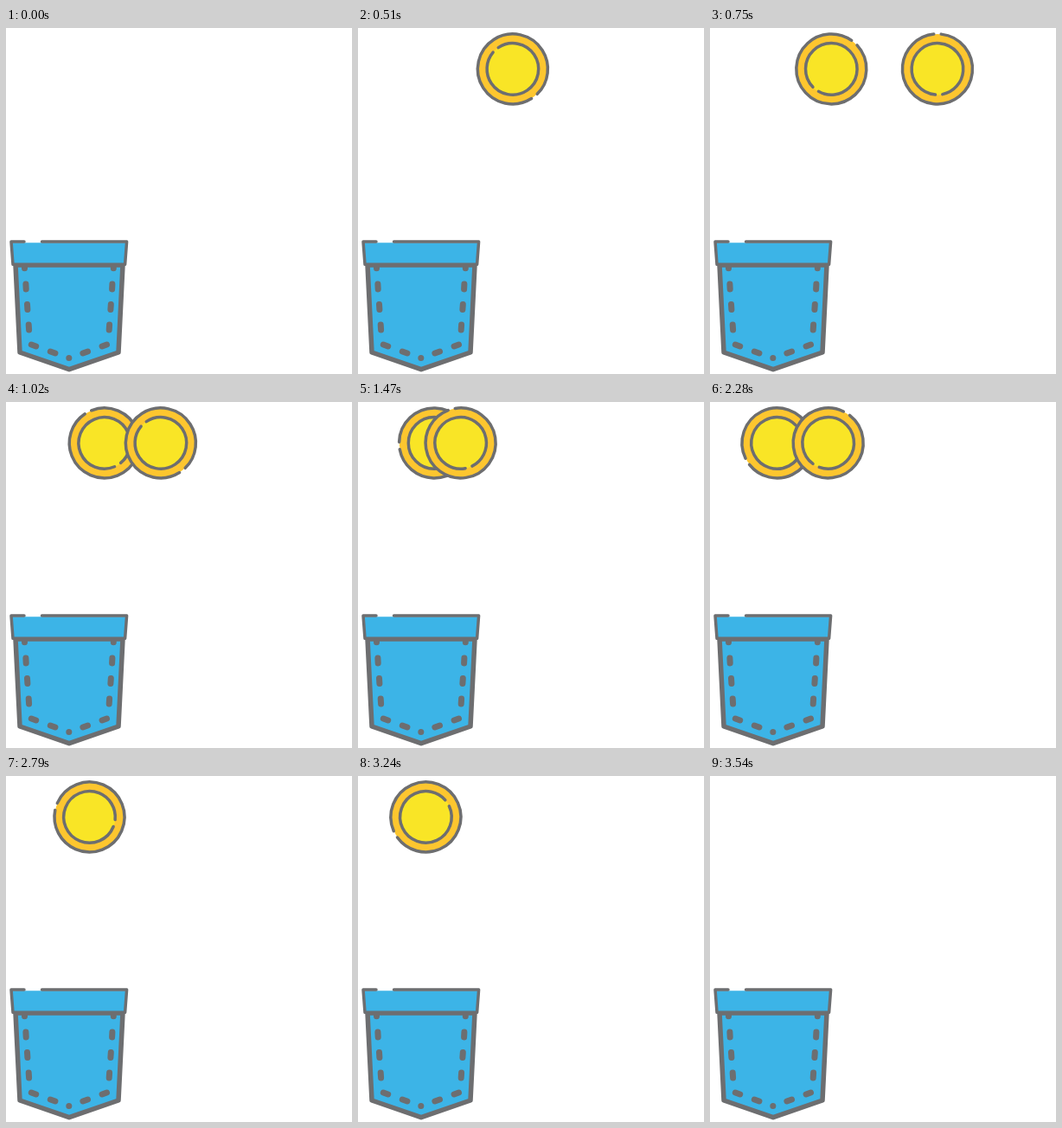
Write an HTML page that moves like this. It is 400 px wide and 400 px high and loops after 3.6 s.

```html
<!DOCTYPE html>
<html lang="en">
<head>
<meta charset="utf-8">
<title>Coins into a pocket</title>
<style>
  html, body { margin: 0; width: 100%; height: 100%; overflow: hidden; background: #fff; }
  svg { display: block; width: 100vw; height: 100vh; }
  .line { fill: none; stroke: #6d6e70; stroke-width: 3.5; stroke-linecap: round; stroke-linejoin: round; }
  .blue { fill: #3cb4e7; }
</style>
</head>
<body>
<svg viewBox="0 0 400 400">
  <defs>
    <g id="coin">
      <circle r="40.3" fill="#fdc62f"/>
      <circle r="30" fill="#f9e526"/>
      <circle class="line" r="40.5" pathLength="360" stroke-dasharray="348 12" transform="rotate(6)"/>
      <circle class="line" r="29.8" pathLength="360" stroke-dasharray="344 16" transform="rotate(184.5)"/>
    </g>
    <g id="stitches" class="line" stroke-linecap="round">
      <path style="stroke-width:7" d="M21.5 277.5v.3M22.9 296l.3 6M24.5 319.5l.4 6M26.2 343l.4 6M29.3 366l5.4 2M51.3 374l5.6 2"/>
    </g>
  </defs>
  <g id="coins"></g>
  <g id="pocket">
    <path class="line blue" style="fill:#3cb4e7;stroke-width:5.5" d="M11 274L16 375L73 394.7L130 375L135 274Z"/>
    <use href="#stitches"/>
    <use href="#stitches" transform="matrix(-1 0 0 1 145.8 0)"/>
    <circle cx="72.8" cy="381.5" r="3.5" fill="#6d6e70"/>
    <path class="blue" d="M6 248.3H140L138 273.5H8Z"/>
    <path class="line" d="M21 247H6L8 273.3H137.6L139.6 247H41.5"/>
  </g>
</svg>
<script>
const LOOP = 3600, STARTS = [0, 510, 1500];
const ROLL = 1770, REST_X = 77.5, ROLL_Y = 47.4;
const GRAVITY = 0.0055, HIT = 180, BOUNCE = 90, FALL = HIT + BOUNCE;

const pocket = document.getElementById('pocket');
const coins = STARTS.map(() => {
  const coin = document.createElementNS('http://www.w3.org/2000/svg', 'use');
  coin.setAttribute('href', '#coin');
  return document.getElementById('coins').appendChild(coin);
});

// Fast entry from the right that slows to a steady creep
function rollX(age) {
  const r = 1 - Math.cbrt((Math.min(age, ROLL) + 60) / (ROLL + 60));
  return REST_X + r * (165 + r * (280 + r * 580));
}

function draw(now) {
  const t = now % LOOP;
  let dip = 0;
  coins.forEach((coin, i) => {
    const age = t - STARTS[i];
    const fall = Math.max(0, age - ROLL);
    const x = rollX(Math.max(0, age));
    const y = ROLL_Y + GRAVITY * Math.min(fall, 225) ** 2;
    const angle = 50.6 + 2.6 * (x - 178.5);
    coin.setAttribute('visibility', age >= 0 && fall < FALL ? 'visible' : 'hidden');
    coin.setAttribute('transform', `translate(${x} ${y}) rotate(${angle})`);
    if (fall > HIT && fall < FALL) dip = 7 * Math.sin(Math.PI * (fall - HIT) / BOUNCE);
  });
  pocket.setAttribute('transform', `translate(0 ${dip})`);
}

const start = performance.now();
function tick() {
  draw(performance.now() - start);
  requestAnimationFrame(tick);
}
tick();
</script>
</body>
</html>
```
